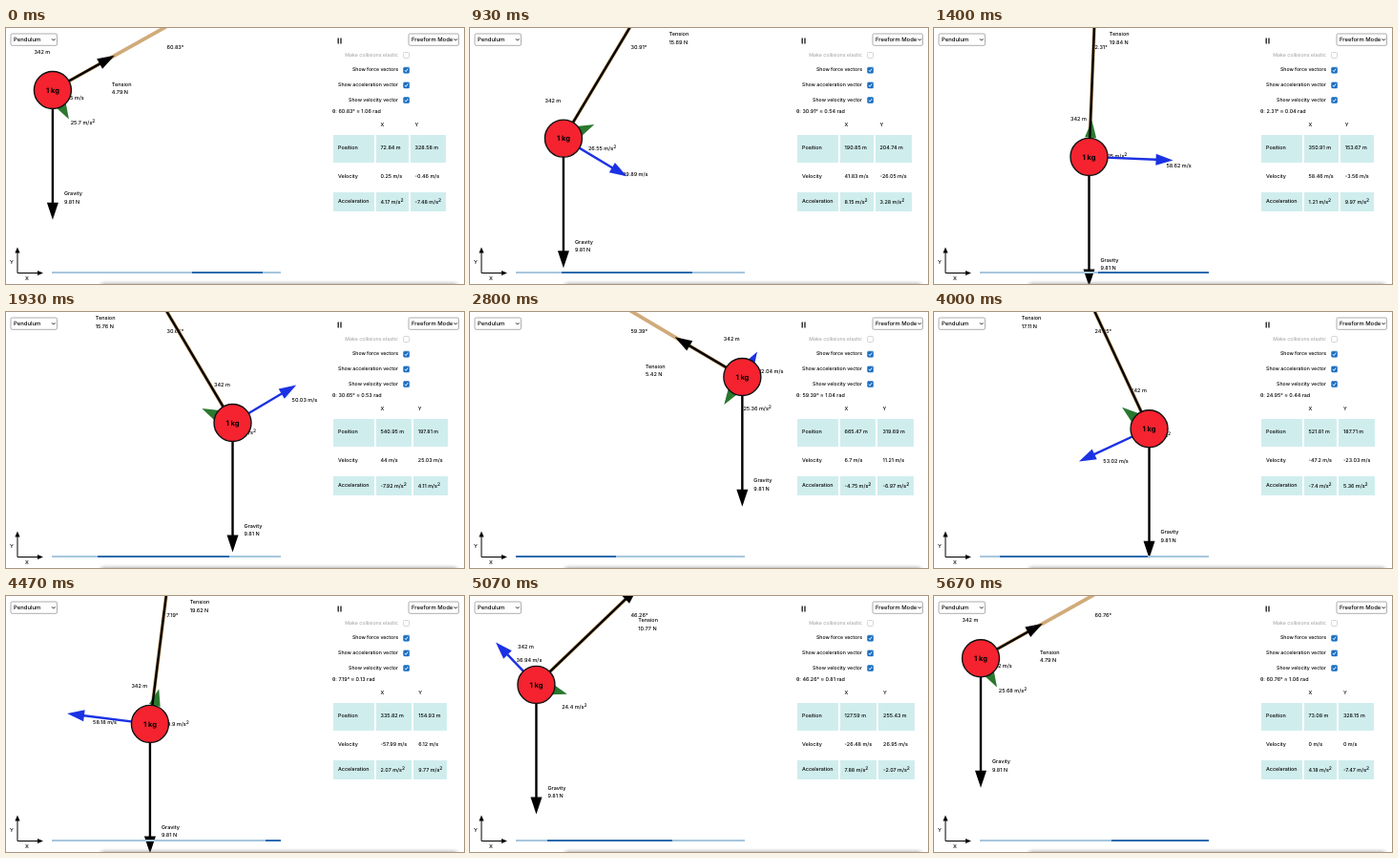
Write an HTML page that moves like this. It is 480 by 268 pixels and loops after 5740 ms.

```html
<!DOCTYPE html>
<html lang="en">
<head>
<meta charset="utf-8">
<title>Pendulum</title>
<style>
  html, body { margin: 0; width: 100%; height: 100%; overflow: hidden; background: #fff; }
  body { position: relative; font: 500 5.5px Inter, "Open Sans", sans-serif; color: #000; text-rendering: geometricPrecision; }
  svg { position: absolute; left: 0; top: 0; width: 480px; height: 268px; }
  svg text { white-space: pre; dominant-baseline: central; }
  .menu { font-size: 5.9px; }
  .option { font-size: 5.2px; text-anchor: end; }
  #mass { font-size: 7.5px; font-weight: 700; text-anchor: middle; }
  .edge { position: absolute; left: 100px; right: 8px; top: 268px; height: 4px; box-shadow: 0 0 4px #888; }

  .bar { position: absolute; left: 48px; top: 255px; width: 240px; height: 2px; overflow: hidden; background: #a6c6de; }
  .bar i { position: absolute; top: 0; bottom: 0; background: #2a6cae; }
  .bar i:first-child { animation: long 2.1s cubic-bezier(.65, .815, .735, .395) calc(var(--t) * -1ms) infinite paused; }
  .bar i:last-child { animation: short 2.1s cubic-bezier(.165, .84, .44, 1) calc(1150ms - var(--t) * 1ms) infinite paused; }
  @keyframes long { 0% { left: -35%; right: 100%; } 60%, 100% { left: 100%; right: -90%; } }
  @keyframes short { 0% { left: -200%; right: 100%; } 60%, 100% { left: 107%; right: -8%; } }

  table { position: absolute; left: 341px; top: 92px; border-spacing: 2px; white-space: nowrap; font-size: 5.4px; line-height: 7px; }
  th, td { padding: 0 5px; text-align: left; font-weight: 500; vertical-align: middle; }
  tr { height: 27.5px; }
  tr:first-child { height: 16px; }
  tr:nth-child(2) { height: 28.5px; }
  tr:last-child { height: 20px; }
  tr:nth-child(even) td { background: #d0edee; }
  #ax, #ay { padding-top: 2px; }
  sup { font-size: 5px; line-height: 0; vertical-align: 2.4px; }
</style>
</head>
<body>
<svg viewBox="0 0 480 268">
  <g id="labels">
    <text id="length">342 m</text>
    <text id="angle" x="168.5" y="21"></text>
    <text id="gravity">Gravity</text><text id="gravityN">9.81 N</text>
    <text id="tension">Tension</text><text id="tensionN"></text>
    <text id="speed"></text>
    <text id="accel"><tspan id="accelN"></tspan><tspan dy="-2.2" font-size="5">2</tspan></text>
  </g>
  <line id="rope" x1="168" y1="-1.4" stroke="#d0ab7a" stroke-width="3.8"/>
  <g id="arrows"></g>
  <circle id="bob" r="19.5" fill="#f4232f" stroke="#111" stroke-width="1.4"/>
  <text id="mass">1 kg</text>

  <g stroke="#000" fill="#000">
    <path d="M12 234V256.5H34" fill="none"/>
    <path d="M12 229.5l2.6 6h-5.2zM39 256.5l-6 2.6v-5.2z" stroke="none"/>
    <path d="M348.2 10.5v6M351 10.5v6" stroke-width="1.2"/>
  </g>
  <text x="4" y="246">Y</text>
  <text x="20" y="262.5">X</text>

  <g fill="#fff" stroke="#777" stroke-width=".6">
    <rect x="5" y="6" width="48.5" height="12.3" rx="1.5"/>
    <rect x="422" y="6" width="52.5" height="12.3" rx="1.5"/>
    <path d="M48 11.3l1.7 1.8 1.7-1.8M469.6 11.3l1.7 1.8 1.7-1.8" fill="none" stroke="#111" stroke-width=".9"/>
  </g>
  <text class="menu" x="8" y="12.3">Pendulum</text>
  <text class="menu" x="425" y="12.3">Freeform Mode</text>
  <g id="options"></g>
  <text id="theta" x="342" y="88" font-size="5.4"></text>
</svg>

<div class="bar" id="bar"><i></i><i></i></div>
<div class="edge"></div>

<table>
  <tr><th></th><th>X</th><th>Y</th></tr>
  <tr><td>Position</td><td id="px"></td><td id="py"></td></tr>
  <tr><td>Velocity</td><td id="vx"></td><td id="vy"></td></tr>
  <tr><td>Acceleration</td><td id="ax"></td><td id="ay"></td></tr>
</table>

<script>
const LOOP = 5740, FPS = 15, LAST = 85;
const G = 9.81, L = 342.22, SCALE = 0.3985, LAG = 0.12;
const PIVOT = { x: 168, y: -1.4 };
const ORIGIN = { x: 371.72, y: 495.26 };
const OMEGA = Math.sqrt(G / L), RAD = Math.PI / 180;
const CLOCK = [[0, 0.181], [14, 6.662], [29, 13.2615], [42, 18.54], [53, 23.9405], [67, 30.662], [85, 40.021]];

const $ = id => document.getElementById(id);
const fmt = v => `${+v.toFixed(2)}`;
const put = (id, text) => { $(id).textContent = text; };
const place = (id, x, y) => {
  $(id).setAttribute("x", x.toFixed(2));
  $(id).setAttribute("y", y.toFixed(2));
};

function simTime(step) {
  const n = CLOCK.findIndex(([s], i) => i > 0 && step <= s);
  const [s0, t0] = CLOCK[n - 1], [s1, t1] = CLOCK[n];
  return t0 + (t1 - t0) * (step - s0) / (s1 - s0);
}

// Exact pendulum swing, released at the left; vectors point up for positive y
function swing(time, amplitude) {
  const k = Math.sin(amplitude / 2), n = 400, h = time / n * OMEGA;
  const rate = p => Math.sqrt(1 - (k * Math.sin(p)) ** 2);
  let phi = -Math.PI / 2;
  for (let i = 0; i < n; i++) phi += h * rate(phi + h / 2 * rate(phi));
  const a = 2 * Math.asin(k * Math.sin(phi));
  const w = 2 * k * OMEGA * Math.cos(phi);
  const sin = Math.sin(a), cos = Math.cos(a);
  const tang = -G * sin, cent = w * w * L;
  return {
    a, sin, cos,
    x: L * sin, y: -L * cos,
    vx: w * L * cos, vy: w * L * sin,
    ax: tang * cos - cent * sin, ay: tang * sin + cent * cos,
    tension: cent + G * cos
  };
}

function makeArrow(color) {
  const g = document.createElementNS("http://www.w3.org/2000/svg", "g");
  g.innerHTML = `<line stroke="${color}" stroke-width="2.4"/><path fill="${color}"/>`;
  $("arrows").append(g);
  return (x, y, dx, dy, size) => {
    const len = 16 + size, turn = Math.atan2(dy, dx) / RAD;
    g.setAttribute("transform", `translate(${x} ${y}) rotate(${turn})`);
    g.firstChild.setAttribute("x2", Math.max(0, len - 12));
    g.lastChild.setAttribute("d", `M${len} 0l-18 6v-12z`);
  };
}
const drawAccel = makeArrow("#2a782f");
const drawVelocity = makeArrow("#1b32e4");
const drawGravity = makeArrow("#000");
const drawTension = makeArrow("#000");

const OPTIONS = ["Make collisions elastic", "Show force vectors", "Show acceleration vector", "Show velocity vector"];
$("options").innerHTML = OPTIONS.map((name, i) => {
  const y = 28.5 + i * 15.7, on = i > 0;
  return `<text class="option" x="411" y="${y}" fill="${on ? "#000" : "#aaa"}">${name}</text>
    <rect x="416.6" y="${y - 3}" width="6" height="6" rx="1" fill="${on ? "#1b6fc2" : "#fff"}" stroke="${on ? "#1b6fc2" : "#bbb"}" stroke-width=".6"/>
    ${on ? `<path d="M418 ${y}l1.2 1.5 2-3" fill="none" stroke="#fff" stroke-width=".9"/>` : ""}`;
}).join("");

function draw(step) {
  const amplitude = (60.855 - 0.001 * step) * RAD, time = simTime(step);
  const now = swing(time, amplitude), before = swing(time - LAG, amplitude);
  const x = PIVOT.x + now.x * SCALE, y = PIVOT.y - now.y * SCALE;
  const deg = Math.abs(now.a) / RAD;
  const speed = Math.hypot(now.vx, now.vy), acc = Math.hypot(now.ax, now.ay);

  $("bob").setAttribute("cx", x);
  $("bob").setAttribute("cy", y);
  $("rope").setAttribute("x2", x);
  $("rope").setAttribute("y2", y);
  place("mass", x, y + 0.3);

  drawGravity(x, y, 0, 1, 12.19 * G);
  drawTension(x, y, -now.sin, -now.cos, 12.19 * now.tension);
  drawVelocity(x, y, now.vx, -now.vy, 1.23 * speed);
  drawAccel(x, y, now.ax, -now.ay, 2.2 * acc);

  place("length", x - 19.5, y - 39);
  place("gravity", x + 12, y + 109);
  place("gravityN", x + 12, y + 117.5);
  place("speed", x + 10 + 1.21 * now.vx, y + 7.5 - 1.21 * now.vy);
  place("accel", x + 10.5 + 17 * now.ax / acc, y + 19 - 18.5 * now.ay / acc);

  // The tension label keeps to the outer side of its arrow and inside the stage
  const reach = 16 + 12.19 * now.tension, gap = 11.5 - 0.239 * deg;
  const tx = x - now.sin * reach + (now.a < 0 ? gap : -gap - 33.5);
  const ty = Math.max(7, y - now.cos * reach + 31 + (60.8 - deg) * 0.3);
  place("tension", tx, ty);
  place("tensionN", tx, ty + 8.5);

  put("angle", `${fmt(deg)}°`);
  put("theta", `θ: ${fmt(deg)}° ≈ ${fmt(Math.abs(now.a))} rad`);
  put("tensionN", `${fmt(now.tension)} N`);
  put("speed", `${fmt(speed)} m/s`);
  put("accelN", `${fmt(3 * acc)} m/s`);
  put("px", `${fmt(ORIGIN.x + before.x)} m`);
  put("py", `${fmt(ORIGIN.y + before.y)} m`);
  put("vx", `${fmt(before.vx)} m/s`);
  put("vy", `${fmt(before.vy)} m/s`);
  $("ax").innerHTML = `${fmt(before.ax)} m/s<sup>2</sup>`;
  $("ay").innerHTML = `${fmt(before.ay)} m/s<sup>2</sup>`;
  $("bar").style.setProperty("--t", 1649 + step * 1000 / FPS);
}

const start = performance.now();
let shown = -1;
function tick() {
  const t = (performance.now() - start) % LOOP;
  const step = Math.min(LAST, Math.floor((t + 3.4) * FPS / 1000));
  if (step !== shown) draw(shown = step);
  requestAnimationFrame(tick);
}
tick();
</script>
</body>
</html>
```
